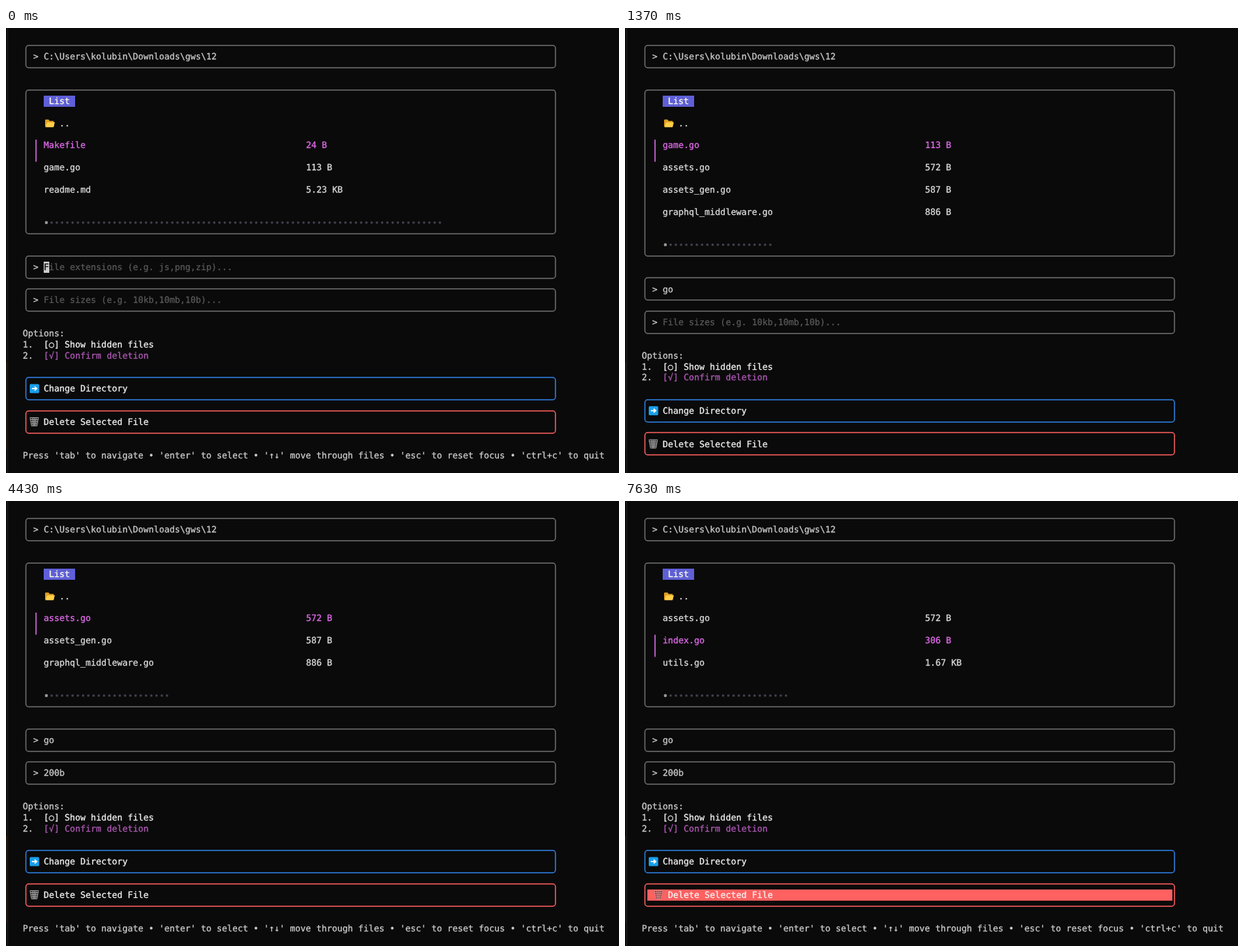
These frames come from a looping animation (878 by 638 pixels, 8000 ms). An HTML page:

```html
<!DOCTYPE html>
<html lang="en">
<head>
<meta charset="utf-8">
<title>File cleaner</title>
<style>
  html, body { margin: 0; width: 100%; height: 100%; overflow: hidden; background: #0a0a0a; }
  svg { display: block; width: 878px; height: 638px; }
  text {
    font: 12.482px "DejaVu Sans Mono", "Noto Sans Mono", monospace;
    font-variant-ligatures: none;
    text-rendering: geometricPrecision;
    white-space: pre;
    stroke-width: .3px;
  }
</style>
</head>
<body>
<svg id="screen" viewBox="0 0 878 638"></svg>
<script>
const LOOP = 8000, CELL = 7.515, LINE = 15.865;
const BLUE = '#1e90ff', RED = '#ff6060', GREY = '#707070', PLAIN = '#cccccc', WHITE = '#f4f4f4';
const PINK = '#e06bea', PURPLE = '#ad58b4';

// Terminal grid: column to x, row to the y of its middle.
const X = col => 24 + col * CELL;
const Y = row => 41 + row * LINE;

const text = (col, row, str, fill = PLAIN) =>
  `<text x="${X(col)}" y="${Y(row) + 4.4}" fill="${fill}" stroke="${fill}">${str}</text>`;
const rect = (x, y, w, h, fill) =>
  `<rect x="${x}" y="${y}" width="${w}" height="${h}" fill="${fill}"/>`;
const fillCells = (col, row, n, fill) =>
  rect(Math.round(X(col)), Math.round(Y(row) - LINE / 2), Math.round(n * CELL), 16, fill);
const frame = (top, bottom, stroke = GREY) =>
  `<rect x="28.5" y="${Math.round(Y(top))}" width="758.5" height="${Math.round((bottom - top) * LINE)}" rx="4"
    fill="none" stroke="${stroke}" stroke-width="1.5"/>`;
const icon = (x, row, body) => `<g transform="translate(${x} ${Y(row)})">${body}</g>`;

const FOLDER = `<path d="M0-4q0-1 1-1h4l1.5 2h5q1 0 1 1v7H0z" fill="#e0a020"/>
  <path d="M3-1h11l-2 7H.5z" fill="#ffcf48"/>`;
const ARROW = `<path d="M3 0h7M7-2.8 10 0 7 2.8" fill="none" stroke="#fff" stroke-width="1.7"/>`;
const BIN = `<path d="M.5-6h12l-2 12h-8zM.8-3h11.4M1.5 0h10M2 3h9M4-6l1 12M6.5-6V6M9-6 8 6"
  fill="#333" stroke="#a8a8a8" stroke-width=".9"/>`;

function input(row, value, hint, cursor) {
  let out = frame(row - 1, row + 1) + text(2, row, '&gt;');
  out += value ? text(4, row, value) : text(4, row, hint, '#585858');
  if (cursor) {
    out += fillCells(4 + value.length, row, 1, PLAIN);
    if (!value) out += text(4, row, hint[0], '#0a0a0a');
  }
  return out;
}

function fileList(files, selected, pages) {
  const end = 10 + files.length * 2;
  let out = frame(3, end) + fillCells(4, 4, 6, '#5f5fd7') + text(5, 4, 'List', '#ffffe4');
  out += icon(56, 6, FOLDER) + text(7, 6, '..', '#dddddd');
  files.forEach(([name, size], i) => {
    const row = 8 + i * 2, on = i === selected, color = on ? PINK : '#dddddd';
    out += text(4, row, name, color) + text(54, row, size, color);
    if (on) out += rect(42, Y(row - .5), 2, LINE * 2, PURPLE);
  });
  for (let i = 0; i < pages; i++)
    out += `<circle cx="${X(4.5 + i)}" cy="${Y(end - 1)}" r="${i ? 1.8 : 2.2}" fill="${i ? '#414150' : '#979797'}"/>`;
  return out;
}

function buttons(row, focus) {
  const dir = focus === 'dir', del = focus === 'del';
  let out = frame(row - 1, row + 1, '#2f82e6') + frame(row + 2, row + 4, RED);
  if (dir) out += fillCells(1, row, 100, BLUE);
  out += icon(34, row, `<rect y="-6.5" width="13.5" height="13" rx="1.5" fill="#18a0ee"/>` + ARROW);
  out += text(4, row, 'Change Directory', WHITE);
  if (del) out += fillCells(1, row + 3, 100, RED);
  out += `<g opacity="${del ? .5 : 1}">${icon(del ? 41.5 : 34, row + 3, BIN)}</g>`;
  return out + text(del ? 5 : 4, row + 3, 'Delete Selected File', WHITE);
}

function draw(s) {
  const r = 10 + s.files.length * 2;   // last row of the list box
  return rect(0, 0, 878, 638, '#0a0a0a') + rect(2, 0, 1, 638, '#222') + rect(0, 480, 1, 125, '#2a1c10') +
    frame(-1, 1) + text(2, 0, '&gt; C:\\Users\\kolubin\\Downloads\\gws\\12') +
    fileList(s.files, s.selected, s.pages) +
    input(r + 3, s.ext, 'File extensions (e.g. js,png,zip)...', s.focus === 'ext') +
    input(r + 6, s.size, 'File sizes (e.g. 10kb,10mb,10b)...', s.focus === 'size') +
    text(0, r + 9, 'Options:') +
    text(0, r + 10, '1.') + text(4, r + 10, '[○] Show hidden files', WHITE) +
    text(0, r + 11, '2.') + text(4, r + 11, '[√] Confirm deletion', PURPLE) +
    buttons(r + 14, s.focus) +
    text(0, r + 20, "Press 'tab' to navigate • 'enter' to select • '↑↓' move through files • 'esc' to reset focus • 'ctrl+c' to quit");
}

const game = ['game.go', '113 B'], assets = ['assets.go', '572 B'], gen = ['assets_gen.go', '587 B'],
  graphql = ['graphql_middleware.go', '886 B'], index = ['index.go', '306 B'], utils = ['utils.go', '1.67 KB'];

// Each step changes part of the state at its time in ms.
const steps = [
  [0, { ext: '', size: '', focus: 'ext', selected: 0, pages: 76,
        files: [['Makefile', '24 B'], game, ['readme.md', '5.23 KB']] }],
  [30, { ext: 'g' }],
  [300, { ext: 'go', files: [game, assets, gen, graphql], pages: 21 }],
  [800, { focus: 'size' }],
  [1370, { focus: '' }],
  [1570, { focus: 'size', size: '2', files: [game, assets, gen], pages: 26 }],
  [1830, { size: '20' }],
  [1970, { size: '200' }],
  [2130, { size: '200b', files: [assets, gen, graphql], pages: 24 }],
  [2900, { focus: '' }],
  [3400, { focus: 'size' }],
  [3930, { focus: '' }],
  [4930, { focus: 'dir' }],
  [5270, { focus: 'del' }],
  [5500, { selected: 1 }],
  [5970, { files: [assets, graphql, index] }],
  [7500, { files: [assets, index, utils] }]
];

const screen = document.getElementById('screen');
let start, shown = -1;

function tick(now) {
  start ??= now;
  const t = (now - start) % LOOP;
  const past = steps.filter(([at]) => at <= t);
  if (past.length !== shown) {
    shown = past.length;
    screen.innerHTML = draw(Object.assign({}, ...past.map(step => step[1])));
  }
  requestAnimationFrame(tick);
}
requestAnimationFrame(tick);
</script>
</body>
</html>
```
